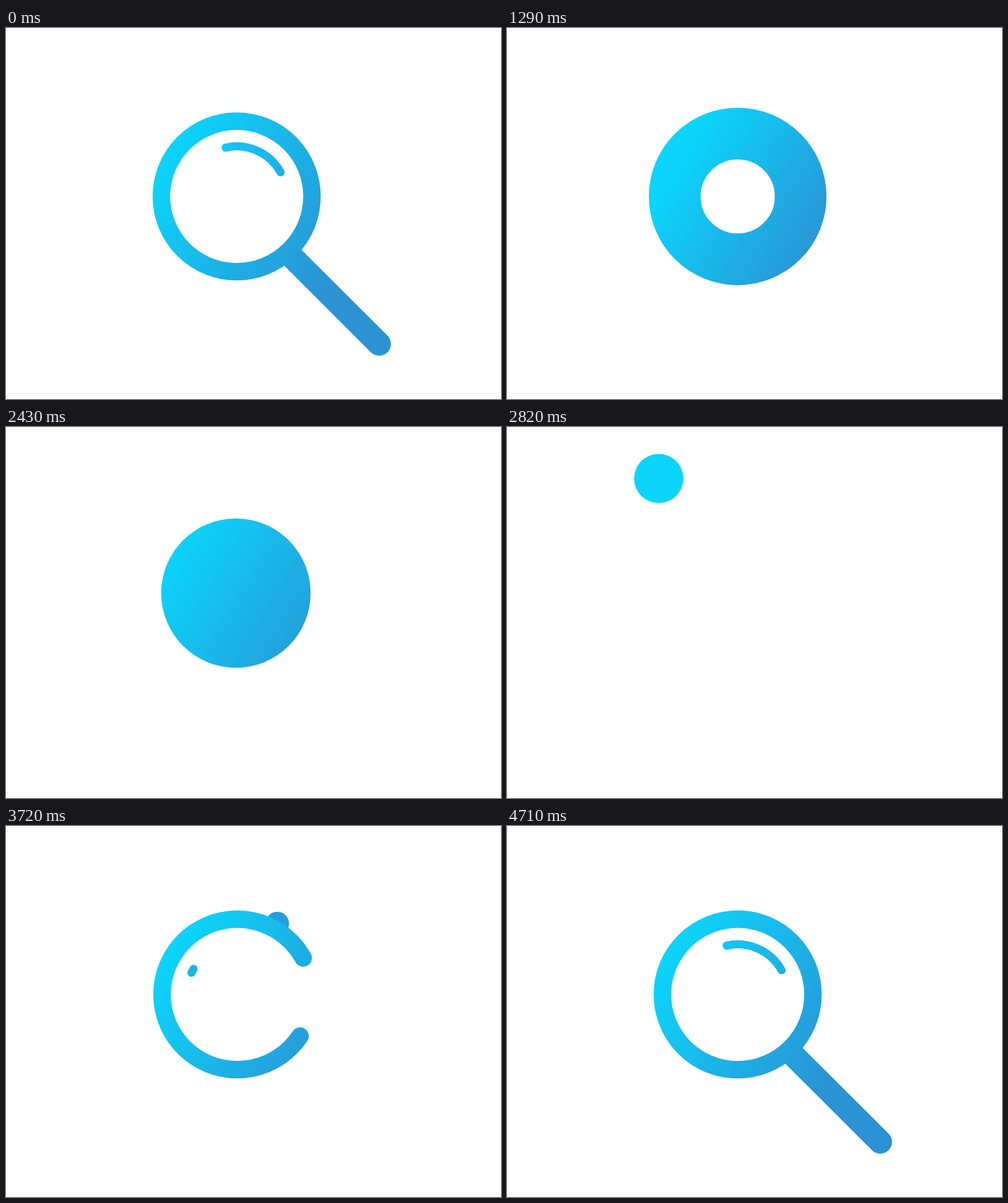
An HTML page with a canvas for the animation above (4740 ms loop, 800 px wide and 600 px high).

```html
<!DOCTYPE html>
<html lang="en">
<head>
<meta charset="utf-8">
<title>Magnifier loop</title>
<style>
html, body { margin: 0; width: 100%; height: 100%; overflow: hidden; background: #fff; }
canvas { display: block; }
</style>
</head>
<body>
<canvas id="stage" width="800" height="600"></canvas>
<script>
const ctx = document.getElementById('stage').getContext('2d');
const LOOP = 4740, STEP = 30;
const CX = 372.8, CY = 272.4;
const RING = 121.7, RING_WIDTH = 28.3;
const HANDLE_START = 132, HANDLE_END = 331.6;
const rad = Math.PI / 180;

const blue = ctx.createLinearGradient(-116, -69, 172, 102);
blue.addColorStop(0, '#0bd5fa');
blue.addColorStop(1, '#2b92d4');

const mix = (a, b, p) => a + (b - a) * p;
const progress = (t, from, to) => Math.min(1, Math.max(0, (t - from) / (to - from)));
const smooth = (t, from, to) => {
  const p = progress(t, from, to);
  return p * p * (3 - 2 * p);
};

// Draws around the lens centre; the gradient turns and scales with the part.
function place(draw, { x = 0, angle = 0, scale = 1 } = {}) {
  ctx.save();
  ctx.translate(CX + x, CY);
  ctx.rotate(angle * rad);
  ctx.scale(scale, scale);
  draw();
  ctx.restore();
}

function arc(radius, from, to, width) {
  ctx.lineWidth = width;
  ctx.beginPath();
  ctx.arc(0, 0, radius, from * rad, to * rad);
  ctx.stroke();
}

function disc(x, y, radius) {
  ctx.beginPath();
  ctx.arc(x, y, radius, 0, 2 * Math.PI);
  ctx.fill();
}

function handle(end, turn) {
  place(() => {
    ctx.rotate(45 * rad);
    ctx.lineWidth = 38;
    ctx.beginPath();
    ctx.moveTo(HANDLE_START, 5.9);
    ctx.lineTo(Math.max(end, HANDLE_START + 0.01), 5.9);
    // Keep the gradient in unrotated lens space.
    ctx.rotate(-45 * rad);
    ctx.stroke();
  }, { angle: turn });
}

// Lens with handle, closing into a solid disc.
function close(t) {
  const pull = progress(t, 900, 1264) ** 4.47;
  if (pull < 1) {
    const stretch = 5.5 * smooth(t, 600, 900);
    handle(mix(HANDLE_END + stretch, 115, pull), 0);
    place(() => arc(81, -102.8, -28.8, 13), { scale: 1 - pull });
  }
  let outer = mix(135.85, 143.5, smooth(t, 1110, 1290));
  outer = mix(outer, 125, smooth(t, 1290, 1500));
  outer = mix(outer, 121.5, smooth(t, 1500, 1740));
  const inner = 107.55 * (1 - smooth(t, 1110, 1500));
  const scale = (outer + inner) / 2 / RING;
  place(() => arc(RING, 0, 360, (outer - inner) / scale), { scale });
}

// The disc leaps up to the left, shrinks and drops onto the ring.
function leap(t) {
  const x = mix(mix(0, -151.8, smooth(t, 2400, 2962)), -RING, smooth(t, 2962, 3105));
  const y = mix(mix(-0.4, -189.5, smooth(t, 2400, 2780)), 0, progress(t, 2780, 3105) ** 3);
  const radius = mix(121.5, RING_WIDTH / 2, smooth(t, 2400, 3016));
  place(() => disc(x, y, radius));
}

// The ring is drawn around, then handle and highlight swing out.
function open(t) {
  const decay = Math.exp((3720 - t) / 124);
  if (t >= 3720) {
    const grow = Math.exp((3720 - t) / 103);
    handle(mix(HANDLE_END, HANDLE_START, grow), -107.8 * decay);
    const turn = -120.5 * decay;
    const span = 74 - 68.9 * decay;
    place(() => arc(81, -28.8 - span, -28.8, 13), { angle: turn });
  }
  const u = (t - 3105) / 615;
  const tail = 180 - 209 * u;
  const span = Math.min(360, 297.4 * u);
  place(() => arc(RING, tail - span, tail, RING_WIDTH), { x: Math.min(4.5, decay) });
}

function render(now) {
  let t = now % LOOP;
  t -= t % STEP;
  ctx.clearRect(0, 0, 800, 600);
  ctx.lineCap = 'round';
  ctx.strokeStyle = ctx.fillStyle = blue;
  if (t < 2430) close(t);
  else if (t < 3105) leap(t);
  else open(t);
}

const start = performance.now();
function tick() {
  render(performance.now() - start);
  requestAnimationFrame(tick);
}
tick();
</script>
</body>
</html>
```
